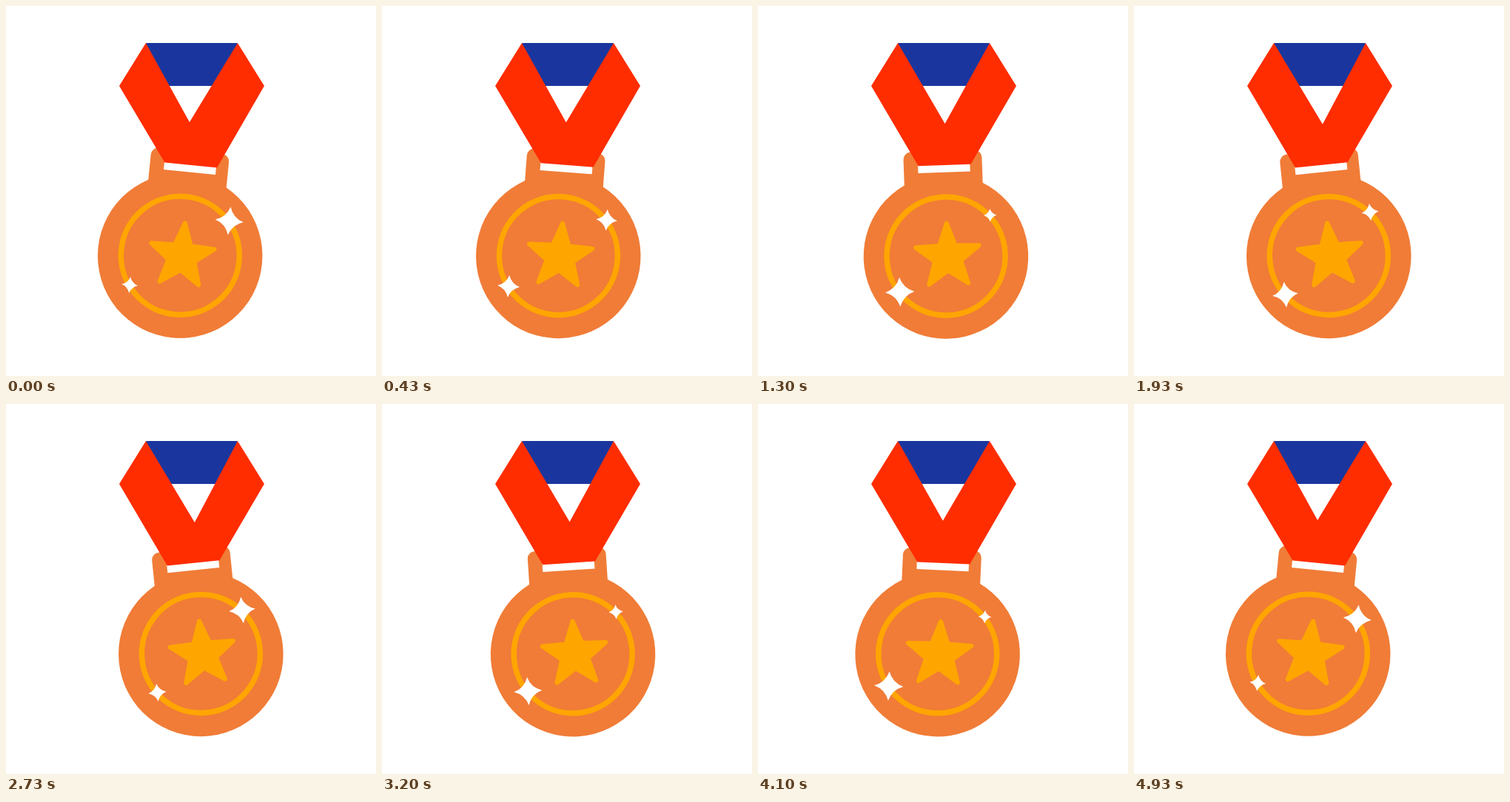
An HTML page for the animation above (5.01 s loop, 500 by 500 pixels).

```html
<!DOCTYPE html>
<html lang="en">
<head>
<meta charset="utf-8">
<title>Swinging medal</title>
<style>
  html, body { margin: 0; width: 100%; height: 100%; overflow: hidden; background: #fff; }
  svg { display: block; width: 100%; height: 100%; }
</style>
</head>
<body>
<svg viewBox="0 0 500 500">
  <defs>
    <path id="sparkle" fill="#fff" d="M0-1Q.24-.24 1 0Q.24 .24 0 1Q-.24 .24-1 0Q-.24-.24 0-1"/>
  </defs>
  <g id="medal">
    <rect x="196.2" y="196" width="106" height="60" rx="10" fill="#f07c37"/>
    <rect x="215.5" y="211" width="70.3" height="13.7" fill="#fff"/>
    <circle cx="248.9" cy="338.4" r="111.3" fill="#f07c37"/>
    <circle cx="249" cy="338" r="80" fill="none" stroke="#ffa500" stroke-width="7.5"/>
    <path id="star" fill="#ffa500" stroke="#ffa500" stroke-width="6" stroke-linejoin="round"/>
    <use id="upper" href="#sparkle"/>
    <use id="lower" href="#sparkle"/>
  </g>
  <path fill="#1a369e" d="M189 50H313L290 108H210Z"/>
  <path id="ribbon" fill="#ff2d00"/>
</svg>
<script>
const LOOP = 5010, PIVOT = [251, 198];
const $ = id => document.getElementById(id);
const clamp = v => Math.min(1, Math.max(0, v));
const ramp = (t, from, to) => (1 - Math.cos(Math.PI * clamp((t - from) / (to - from)))) / 2;

function starPath(cx, cy, outer, inner) {
  const points = Array.from({ length: 10 }, (_, i) => {
    const a = i * Math.PI / 5, r = i % 2 ? inner : outer;
    return [cx + r * Math.sin(a), cy - r * Math.cos(a)];
  });
  return 'M' + points.join('L') + 'Z';
}

function rotate(x, y, degrees) {
  const a = degrees * Math.PI / 180, dx = x - PIVOT[0], dy = y - PIVOT[1];
  return [
    PIVOT[0] + dx * Math.cos(a) - dy * Math.sin(a),
    PIVOT[1] + dx * Math.sin(a) + dy * Math.cos(a)
  ];
}

function place(id, x, y, size) {
  $(id).setAttribute('transform', `translate(${x} ${y}) scale(${size})`);
}

// The picture advances in alternating 30 ms and 70 ms steps.
function step(t) {
  const part = t % 100;
  return Math.min(t - part + (part < 30 ? 0 : 30), 4930);
}

function draw(t) {
  const swing = t < 2400 ? ramp(t, -50, 2240) : 1 - ramp(t, 2400, 4960);
  const angle = 5.6 - 12 * swing;
  $('medal').setAttribute('transform', `rotate(${angle} ${PIVOT})`);

  const left = rotate(216, 215, angle), right = rotate(287, 215, angle);
  const tip = [248 + 7.2 * swing, 157 + 3 * swing];
  $('ribbon').setAttribute('d', `M189 50L153 108L${left}L${right}L349 108L313 50L${tip}Z`);

  const beat = t % (LOOP / 2);
  const glow = 1 - ramp(beat, 50, 850) + ramp(beat, 1650, 2450);
  place('upper', 310.5, 285, 8.8 + 10.2 * glow);
  place('lower', 185, 384.2, 19.7 - 8.7 * glow);
}

$('star').setAttribute('d', starPath(251.3, 339, 45, 18.5));
const start = performance.now();
function frame() {
  draw(step((performance.now() - start) % LOOP));
  requestAnimationFrame(frame);
}
frame();
</script>
</body>
</html>
```
